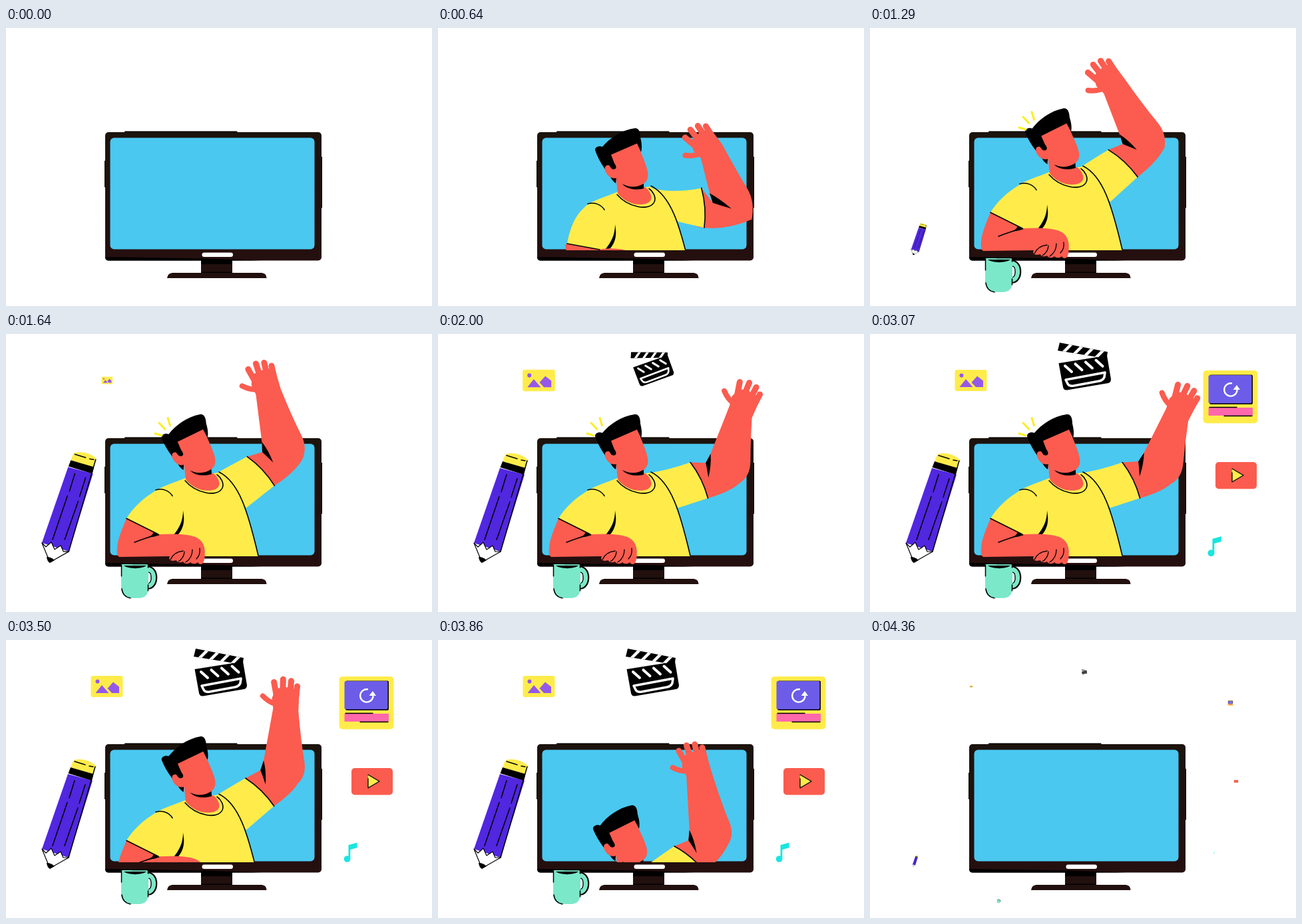
These frames come from a looping animation (640x419 px, 4430 ms). An HTML page with a canvas:

```html
<!DOCTYPE html>
<html lang="en">
<head>
<meta charset="utf-8">
<title>Video creator</title>
<style>
  html, body { margin: 0; width: 100%; height: 100%; overflow: hidden; background: #fff; }
  canvas { display: block; }
</style>
</head>
<body>
<canvas id="stage" width="640" height="419"></canvas>
<script>
const ctx = document.getElementById('stage').getContext('2d');
const LOOP = 4430, STEP = 71.4;
const SKIN = '#fb5c4f', YELLOW = '#ffec4a', BLACK = '#000', FRAME = '#21100e';
const RAD = Math.PI / 180;
const clamp = (v, a, b) => Math.max(a, Math.min(b, v));

// ---- drawing helpers ----
function fill(d, color) {
  ctx.fillStyle = color;
  ctx.fill(new Path2D(d));
}
function line(d, color = BLACK, width = 1.6, cap = 'round') {
  ctx.strokeStyle = color;
  ctx.lineWidth = width;
  ctx.lineCap = cap;
  ctx.lineJoin = 'round';
  ctx.stroke(new Path2D(d));
}
function box(x, y, w, h, r, color) {
  ctx.fillStyle = color;
  ctx.beginPath();
  ctx.roundRect(x, y, w, h, r);
  ctx.fill();
}
function oval(x, y, rx, ry, turn, color) {
  ctx.fillStyle = color;
  ctx.beginPath();
  ctx.ellipse(x, y, rx, ry, turn, 0, 7);
  ctx.fill();
}
function clipped(bottom, draw) {
  ctx.save();
  ctx.beginPath();
  ctx.rect(0, 0, 640, bottom);
  ctx.clip();
  draw();
  ctx.restore();
}
function around(x, y, scale, angle, draw) {
  ctx.save();
  ctx.translate(x, y);
  ctx.rotate(angle * RAD);
  ctx.scale(scale, scale);
  ctx.translate(-x, -y);
  draw();
  ctx.restore();
}
const pt = p => p[0].toFixed(2) + ' ' + p[1].toFixed(2);
// Point at (a, b) in a frame with its origin at o, turned by deg
function at(o, deg, a, b) {
  const c = Math.cos(deg * RAD), s = Math.sin(deg * RAD);
  return [o[0] + a * c - b * s, o[1] + a * s + b * c];
}

// ---- motion ----
// step: upper arm, forearm, hand, wrist reach
const armKeys = [
  [0, 0, -104, -9, 88], [7, -4, -108, -9, 88], [8, -20, -108, -7, 88],
  [11, -43, -112, -2, 93], [16, -47, -117, 0, 95], [18, -47, -117, 0, 95],
  [22, -41, -98, 10, 92], [26, -26, -76.6, 20, 87], [28, -26, -72, 20, 86],
  [34, -47, -115, 0, 95], [40, -26, -72, 18, 85], [41, -26, -71.6, 18, 85],
  [46, -44, -84, 10, 92], [52, -50, -99.6, 3, 97], [57, -50, -110, 0, 97]
];
// step: drop, head tilt, left arm tuck
const bodyKeys = [
  [0, 235, 3, 1], [7, 30, 3, 1], [8, 12, 2.6, .65], [11, 0, 1, 0], [16, 0, 0, 0],
  [19, 0, 0, 0], [26, 0, 3, 0], [28, 0, 3, 0], [34, 0, 0, 0], [41, 0, 3, 0],
  [43, 0, 2.5, 0], [46, 14, 1, 0], [52, 128, 0, 0], [57, 300, 0, 0]
];
// Smooth curve through the keys, flat at every turning point
function sample(keys, n) {
  const last = keys.length - 1;
  let i = 0;
  while (i < last - 1 && n > keys[i + 1][0]) i++;
  const k0 = keys[i], k1 = keys[i + 1], span = k1[0] - k0[0];
  const p = clamp((n - k0[0]) / span, 0, 1), q = 1 - p;
  const slope = (j, c) => {
    if (j === 0 || j === last) return 0;
    const d0 = (keys[j][c] - keys[j - 1][c]) / (keys[j][0] - keys[j - 1][0]);
    const d1 = (keys[j + 1][c] - keys[j][c]) / (keys[j + 1][0] - keys[j][0]);
    return d0 * d1 <= 0 ? 0 : 2 * d0 * d1 / (d0 + d1);
  };
  return k0.slice(1).map((v, m) => {
    const c = m + 1;
    return v * q * q * (1 + 2 * p) + k1[c] * p * p * (1 + 2 * q)
      + span * p * q * (q * slope(i, c) - p * slope(i + 1, c));
  });
}
function popScale(n, start, span) {
  if (n > 53) return clamp(1 - (n - 53) / 6.67, 0, 1);
  const p = clamp((n - start) / span, 0, 1);
  return Math.min(1.3 * p, 1 + .2 * (1 - p));
}

// ---- monitor ----
function monitor() {
  box(178, 155.4, 169.5, 4, 1, '#080504');
  box(148, 200, 3, 40, 0, '#080504');
  box(472, 194, 3, 77, 0, '#080504');
  const g = ctx.createLinearGradient(0, 157, 0, 350);
  g.addColorStop(0, '#1c130d');
  g.addColorStop(1, '#250f0f');
  box(149, 157, 325, 193.5, 5, g);
  fill('M149 345 L300 347.5 L384 350.5 H153 Q149 350 149 345Z', BLACK);
  box(156.5, 165.5, 307, 168, 6, '#4ac8f0');
  box(293, 350, 47, 20, 0, FRAME);
  box(293, 350, 47, 6, 0, BLACK);
  box(293, 367.5, 47, 2, 0, BLACK);
  fill('M242 377 C243 371 246 369 252 369 H382 C388 369 391 371 391.5 377Z', FRAME);
  box(294.5, 338.5, 46.5, 6.5, 3.2, '#fff');
}

// ---- person ----
function rightArm([upper, fore, turn, reach]) {
  const S = [342, 245], E = at(S, upper, 99, 5);
  const A = at(S, upper, 56, -30), B = at(S, upper, 56, 30);
  const F = (a, b) => at(E, fore, a, b);
  const W = F(reach, 0), H = (a, b) => at(W, fore + turn, a, b);
  const bend = clamp((upper - fore - 50) / 50, 0, 1), fold = Math.min(1, bend * 2.2);
  const inner = F(19 + 14 * fold, -29 + 5 * bend);
  const under = F(4 + 14 * fold, -33 + 9 * bend);
  const tip = F(-17 + 18 * fold, -24 + 24 * bend);
  const elbow = F(-13 - 11 * bend, 24);

  fill(`M${pt(at(S, upper, 46, -28))} L${pt(A)} L${pt(under)} L${pt(inner)} L${pt(H(2, -20))}
    L${pt(H(17, -25))} L${pt(H(32, -22))} L${pt(H(37, -9))} L${pt(H(38, 3))} L${pt(H(36, 13))} L${pt(H(6, 18))}
    Q${pt(F(52, 25))} ${pt(F(22, 32))} Q${pt(F(0, 37))} ${pt(elbow)}
    Q${pt(at(S, upper, 90, 36))} ${pt(B)} L${pt(at(S, upper, 46, 28))}Z`, SKIN);
  const fingers = [[24, -20, 41, -27], [30, -11, 48, -14.5], [30, 0, 48, -2], [26, 10, 42, 8.5]];
  for (const [a, b, c, d] of fingers) line(`M${pt(H(a, b))} L${pt(H(c, d))}`, SKIN, 9);
  line(`M${pt(H(9, -17))} Q${pt(H(10, -29))} ${pt(H(17, -39))}`, SKIN, 8);
  fill(`M${pt(inner)} Q${pt(F(4 + 16 * fold, -24 + 12 * bend))} ${pt(tip)}
    Q${pt(F(-2 + 14 * fold, -30 + 14 * bend))} ${pt(under)}Z`, BLACK);

  fill(`M316 210 Q${pt([350, 204 + (upper + 26) * .75])} ${pt(A)} Q${pt(at(S, upper, 62, 0))} ${pt(B)}
    L361 262 L338 240Z`, YELLOW);
  line(`M${pt(A)} Q${pt(at(S, upper, 62, 0))} ${pt(B)}`);
}

function torso(tuck) {
  const cx = 181 + 13 * tuck, cy = 278 + 17 * tuck;
  fill(`M270 217 C252 224 236 229 225 236 C${205 + 5 * tuck} 248 ${190 + 10 * tuck} 263 ${cx} ${cy}
    L${229 + 14 * tuck} ${302 + 2 * tuck} L250 336 H379.5 C366 270 350 225 318 209Z`, YELLOW);
  fill('M267 192 L270 219 C279 232 298 239 312 235 C323 232 323 222 314 212 L309 209 L307 196Z', SKIN);
  line('M269 221 C285 240 318 247 325 232 C328 225 323 216 317 212');
  line('M320 208 C350 223 363 266 379 334');
  line('M225 235 C235 232 245 236 250 244');
  fill('M266 266 C266 282 260 293 251 304 L258 303 C267 293 269 282 266 266Z', BLACK);
}

function leftArm(tuck) {
  const x = 13 * tuck, y = 17 * tuck, cuff = `M${181 + x} ${278 + y} L${229 + 14 * tuck} ${302 + 2 * tuck}`;
  fill(`${cuff} C252 301 280 301 290 309 C299 316 300 327 298 339 C297 348 291 349 288 344
    C285 347 280 347 277 344 C274 347 268 347 266 343 C262 345 257 345 256 341 C249 343 243 341 246 335
    L171 336 C${167 + 28 * tuck} 336 ${166 + 28 * tuck} 328 ${167 + 28 * tuck} 322
    C${168 + 28 * tuck} 309 ${174 + x} 295 ${181 + x} ${278 + y}Z`, SKIN);
  line(cuff);
  if (tuck < .5) {
    fill('M231 303 L221 299 C221 303 217 305 210 307 C219 306 225 305 231 303Z', BLACK);
    line('M193 314 C203 310 214 306 227 303');
  }
  line('M266 327 C257 328 250 333 247 340 M268 328 C268 334 264 340 259 343 M280 325 C280 333 276 340 270 344 M291 323 C292 330 290 335 286 339', BLACK, 1.3);
}

function head(tilt) {
  around(292, 214, 1, tilt - 3, () => {
    fill('M276 204 C286 211 300 211 309 204 L309 212 C297 215 283 213 276 204Z', BLACK);
    fill('M258 192 L268 195 L267 204 Q261 200 258 192Z', BLACK);
    fill('M258 160 L300 143 C304 158 314 176 315.5 190 C316 203 307 208 293 208 C280 208 271 204 268 196 C258 199 250 188 250 179Z', SKIN);
    fill(`M236 154 C236 149 242 147 247 149 C258 136 275 124 296 121 C302 121 304 127 304 135
      C306 143 307 151 305 157 L299 144 L260 161 L265 174 C269 179 268 183 264 183 C260 183 259 179 257 177
      C253 176 250 179 251 183 C244 173 239 163 236 154Z`, BLACK);
  });
}

function person(n) {
  const [drop, tilt, tuck] = sample(bodyKeys, n);
  const pose = sample(armKeys, n);
  const moved = draw => () => {
    ctx.translate(0, drop);
    draw();
  };
  clipped(335, moved(() => {
    rightArm(pose);
    torso(tuck);
    head(tilt);
  }));
  clipped(drop < 15 ? 349 : 335, moved(() => leftArm(tuck)));
  if (n >= 13 && n < 44) {
    line('M224 150 L234 153 M230 134 L239 143.5 M243 126.5 L246.5 138', '#fbee22', 3);
  }
}

// ---- floating items ----
function pencil() {
  fill('M93 202 L130 212 L94 328 L54 315Z', '#5127df');
  fill('M97 192 L101 182 C108 177 128 181 135 190 L131 203Z', YELLOW);
  fill('M97 192 L131.5 202 L129 212 L93.5 201Z', BLACK);
  fill('M54 315 L60 321 L68 314 L73 325 L82 319 L86 328 L94 328 L66 344Z', '#fff');
  line('M54 315 L60 321 L68 314 L73 325 L82 319 L86 328 L94 328 L66 344Z', BLACK, 1.2);
  fill('M61 336 Q68 336 73 341 L66 345 Q62 343 61 336Z', BLACK);
  line('M134 191 L94 328 M103 212 L95 238 M119 218 L110 246 M108 253 L88 310 M92 245 L70 310 M103 183 L119 188 M125 190 L131 191', BLACK, 1.5);
}
function mug() {
  line('M212 355 C226 352 226 382 212 380', BLACK, 9.5);
  line('M211.5 355 C225 353 225 381 211.5 379.5', '#7be8c9', 7);
  line('M214 359 C219 359 220 374 214 376', BLACK, 1.2);
  fill('M173 347 H214 V383 C214 393 208 398 200 398 H188 C179 398 173 392 173 383Z', '#7be8c9');
  fill('M177 349 H211 C204 354.5 184 354.5 177 349Z', BLACK);
  line('M173.5 348 V365 M174 384 C175 392 180 397 187 398 M190 346.5 H213.5 V352 M213.5 378 V387', BLACK, 1.5);
}
function picture() {
  box(127.5, 54, 48, 32, 3, YELLOW);
  oval(137.5, 62.5, 3, 3, 0, '#9459e8');
  fill('M134.5 80 L144 68 L154.5 80Z M152.5 73 L161 63.5 L170 70.5 V80 H159Z', '#9459e8');
}
function clapper() {
  fill('M283.5 44 L356 32.5 L362 68 Q362 73 358 74 L296 84.5 Q291 85 290 80Z', BLACK);
  fill('M285 13 L357 27 L355.5 37 L282 25Z', BLACK);
  ctx.save();
  ctx.clip(new Path2D('M285 13 L357 27 L355.5 37 L282 25Z'));
  for (let i = 0; i < 4; i++) {
    const x = 290 + i * 16, y = 28 + i * 3;
    line(`M${x} ${y} L${x + 14} ${y - 14}`, '#fff', 4.5);
  }
  ctx.restore();
  for (let i = 0; i < 4; i++) {
    const x = 293 + i * 15.5, y = 48 - i * 2.8;
    line(`M${x} ${y} L${x + 10} ${y + 9}`, '#fff', 4);
  }
  line('M294 69 L353 58 L352 65 Q350 70 344 71 L306 78 Q299 79 297 75Z', '#fff', 3.6);
}
function card() {
  box(500.5, 55, 82, 79.5, 5, YELLOW);
  box(510, 61.5, 65, 44.5, 2, BLACK);
  box(508.5, 62, 65, 42.5, 2, '#6c5ce8');
  box(508.5, 111, 66.5, 12, 0, '#ff68ac');
  line('M510 110.5 H551 M532 123.5 H574', BLACK, 1.3);
  line('M543 74.3 A9.7 9.7 0 1 0 551.5 85', '#fff', 2.4);
  fill('M545.5 84 L551 77 L556 84Z', '#fff');
}
function play() {
  box(519, 193, 62, 40.5, 5, '#fb5c4f');
  fill('M544 203 L561 213 L544 223Z', YELLOW);
  line('M544 203 L561 213 L544 223 V209', BLACK, 1.3);
}
function note() {
  oval(512.5, 330, 4.8, 4.8, 0, '#18e6df');
  fill('M514.5 309 L527.5 305.5 V313 L517.3 316 V330 H514.5Z', '#18e6df');
}
// draw, anchor, first step, steps to grow, turn while growing
const items = [
  [pencil, 65, 341, 14, 9, 0], [mug, 193, 396, 11, 6.5, 0], [picture, 152, 70, 19, 7.5, 0],
  [clapper, 322, 48, 21, 8.7, -41], [card, 541.5, 95, 26, 8, 0],
  [play, 550, 213, 31, 7, 0], [note, 517, 321, 35, 7, 0]
];

function render(now) {
  const t = now % LOOP;
  const n = t < 205 ? 0 : Math.min(59, Math.floor((t - 200) / STEP) + 1);
  ctx.fillStyle = '#fff';
  ctx.fillRect(0, 0, 640, 419);
  monitor();
  if (n > 0 && n < 57) person(n);
  for (const [draw, x, y, start, span, turn] of items) {
    const s = popScale(n, start, span);
    if (s > 0) around(x, y, s, n > 53 ? 0 : turn * (1 - s), draw);
  }
}

const begin = performance.now();
function tick() {
  render(performance.now() - begin);
  requestAnimationFrame(tick);
}
tick();
</script>
</body>
</html>
```
